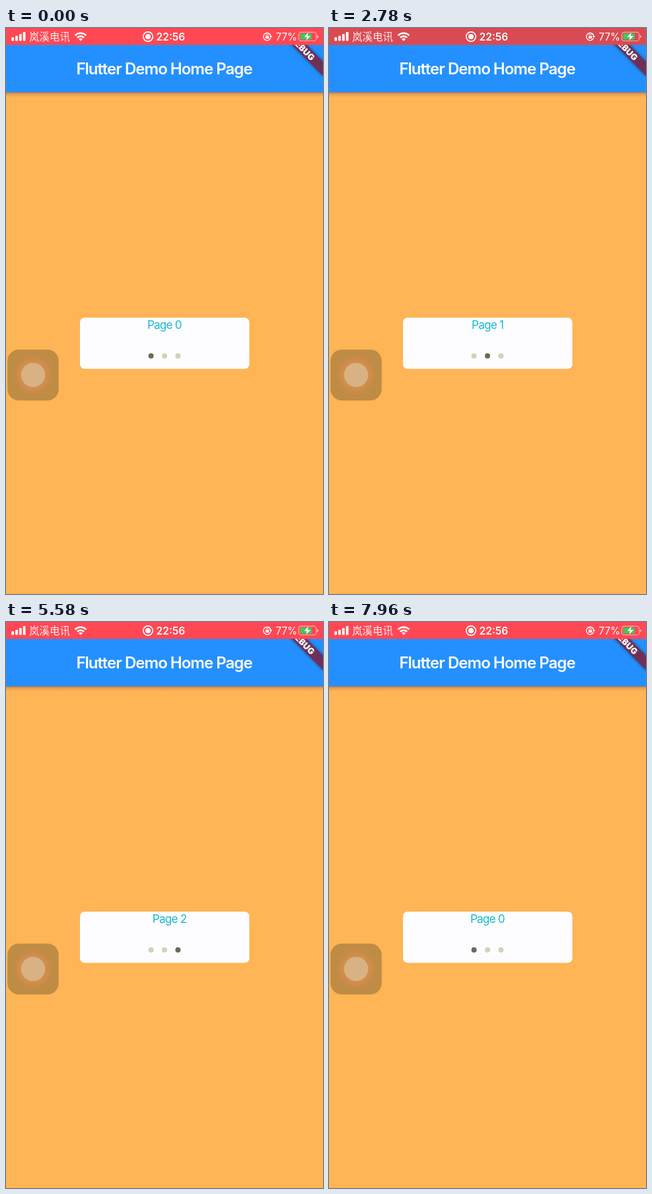
Write an HTML page that moves like this. It is 480x854 px and loops after 8000 ms.

```html
<!DOCTYPE html>
<html lang="en">
<head>
<meta charset="utf-8">
<title>Page carousel</title>
<style>
  html, body { margin: 0; width: 100%; height: 100%; overflow: hidden; background: #ffb455; }
  svg { display: block; width: 100%; height: 100%; }
  text { font-family: Inter, "Noto Sans", sans-serif; fill: #fff; }
  .carrier { font: 400 15.5px "Noto Sans CJK SC", "Noto Sans CJK", sans-serif; fill-opacity: .9; }
  .clock { font-size: 15.5px; font-weight: 600; }
  .title { font-size: 24px; font-weight: 600; letter-spacing: -.98px; text-anchor: middle; }
  .debug { font-size: 13px; font-weight: 900; text-anchor: middle; }
  .page { font-size: 17.2px; letter-spacing: -.85px; text-anchor: middle; fill: #18b8d2; }
</style>
</head>
<body>
<svg viewBox="0 0 480 854" preserveAspectRatio="none">
  <defs>
    <linearGradient id="shade" x2="0" y2="1">
      <stop stop-color="#c4743c" stop-opacity=".85"/>
      <stop offset=".45" stop-color="#e08f48" stop-opacity=".45"/>
      <stop offset="1" stop-color="#ffb455" stop-opacity="0"/>
    </linearGradient>
    <clipPath id="cardClip"><rect x="112" y="437" width="256.5" height="77.3" rx="7"/></clipPath>
    <clipPath id="barClip"><rect y="25" width="480" height="72"/></clipPath>
    <filter id="soft" x="-20%" y="-60%" width="140%" height="220%"><feGaussianBlur stdDeviation="2.5"/></filter>
  </defs>

  <rect width="480" height="854" fill="#ffb455"/>

  <!-- app bar -->
  <rect y="97" width="480" height="9" fill="url(#shade)"/>
  <rect y="25" width="480" height="72.3" fill="#2490ff"/>
  <text class="title" x="239.5" y="70.3">Flutter Demo Home Page</text>
  <g clip-path="url(#barClip)">
    <g transform="translate(480 0) rotate(45)">
      <rect x="-51" y="35.8" width="102" height="15.4" fill="#000" opacity=".5" filter="url(#soft)"/>
      <rect x="-51" y="35.8" width="102" height="15.4" fill="#6f3058"/>
      <text class="debug" x="0" y="48.2">DEBUG</text>
    </g>
  </g>

  <!-- status bar -->
  <rect id="status" width="480" height="25.6"/>
  <g fill="#fff">
    <rect x="8.3" y="14" width="3.8" height="5.4" rx="1"/>
    <rect x="14.1" y="11.7" width="3.8" height="7.7" rx="1"/>
    <rect x="19.9" y="9" width="3.8" height="10.4" rx="1"/>
    <rect x="25.7" y="6" width="3.8" height="13.4" rx="1"/>
  </g>
  <text class="carrier" x="35" y="18.6">岚溪电讯</text>
  <g fill="none" stroke="#fff" stroke-width="2.7">
    <path d="M104.6 11.2a12 12 0 0 1 16.8 0"/>
    <path d="M107.9 14.6a7.3 7.3 0 0 1 10.2 0"/>
  </g>
  <path d="M113 19.8l-2.9-3a4.2 4.2 0 0 1 5.8 0z" fill="#fff"/>
  <circle cx="215" cy="13" r="7.2" fill="none" stroke="#fff" stroke-width="1.7"/>
  <circle cx="215" cy="13" r="4" fill="#fff"/>
  <text class="clock" x="227.6" y="18.6">22:56</text>
  <g fill="none" stroke="#fff" stroke-width="1.4">
    <path d="M400.5 15.4A5.6 5.6 0 1 1 400.9 12"/>
    <path d="M393.9 12.6v-1.3a1.6 1.6 0 0 1 3.2 0v1.3" stroke-width="1"/>
  </g>
  <path d="M398.6 11.9h4.6l-2.3 3z" fill="#fff"/>
  <rect x="393" y="12.3" width="5" height="3.7" rx=".6" fill="#fff"/>
  <text x="408.6" y="18.6" font-size="15.2">77%</text>
  <rect x="443.3" y="6.3" width="26.4" height="13.2" rx="3.8" fill="none" stroke="#fff" stroke-opacity=".55" stroke-width="1.2"/>
  <path d="M471 10.6q2 .6 2 2.3t-2 2.3z" fill="#fff" fill-opacity=".6"/>
  <rect x="445.2" y="8.2" width="17.8" height="9.4" rx="2.2" fill="#45c45b"/>
  <path d="M457.8 6.8l-6.2 6.8h4.2l-1.4 5.4 6.6-7h-4.4z" fill="#fff"/>

  <!-- card -->
  <rect x="112" y="437" width="256.5" height="77.3" rx="7" fill="#fdfdff"/>
  <g clip-path="url(#cardClip)" id="pages"></g>
  <g id="dots"></g>

  <!-- floating touch button -->
  <rect x="2.3" y="485.2" width="77.4" height="76.8" rx="17" fill="#bf8c46"/>
  <g id="rings"></g>
</svg>
<script>
  const NS = 'http://www.w3.org/2000/svg';
  const LOOP = 8000, WIDTH = 256, COUNT = 3;
  const STARTS = [1430, 4480, 6240], SLIDE = 1414;
  const $ = id => document.getElementById(id);

  function add(parent, name, attrs, text = '') {
    const el = document.createElementNS(NS, name);
    for (const key in attrs) el.setAttribute(key, attrs[key]);
    el.textContent = text;
    return parent.appendChild(el);
  }

  const clamp = x => Math.min(1, Math.max(0, x));
  const smooth = x => { x = clamp(x); return x * x * (3 - 2 * x); };

  // cubic-bezier(.25, .1, .25, 1)
  const bezier = (a, b, u) => 3 * a * u * (1 - u) ** 2 + 3 * b * u * u * (1 - u) + u ** 3;
  function ease(x) {
    if (x <= 0 || x >= 1) return clamp(x);
    let lo = 0, hi = 1;
    for (let i = 0; i < 20; i++) {
      const mid = (lo + hi) / 2;
      if (bezier(.25, .25, mid) < x) lo = mid; else hi = mid;
    }
    return bezier(.1, 1, lo);
  }

  const pages = Array.from({ length: COUNT + 1 }, (_, i) =>
    add($('pages'), 'text', { class: 'page', y: 454 }, 'Page ' + i % COUNT));
  const dots = Array.from({ length: COUNT }, (_, i) =>
    add($('dots'), 'circle', { cx: 219.6 + 20.4 * i, cy: 494.8, r: 4 }));
  [[30, '#c68b47'], [24.5, '#d08e4b'], [18.3, '#d9b283']].forEach(([r, fill]) =>
    add($('rings'), 'circle', { cx: 41, cy: 523.5, r, fill }));

  const mix = (a, b, k) => `rgb(${a.map((v, i) => Math.round(v + (b[i] - v) * k))})`;

  function draw(t) {
    const pos = STARTS.reduce((sum, start) => sum + ease((t - start) / SLIDE), 0);
    pages.forEach((page, i) => page.setAttribute('x', 239.8 + (i - pos) * WIDTH));
    const active = Math.round(pos) % COUNT;
    dots.forEach((dot, i) => dot.setAttribute('fill', i === active ? '#6b6a54' : '#d3d2b6'));

    const muted = smooth((t - 1900) / 700) - smooth((t - 4850) / 650);
    $('status').setAttribute('fill', mix([255, 72, 84], [218, 74, 82], muted));
  }

  const begin = performance.now();
  function tick() {
    draw((performance.now() - begin) % LOOP);
    requestAnimationFrame(tick);
  }
  tick();
</script>
</body>
</html>
```
